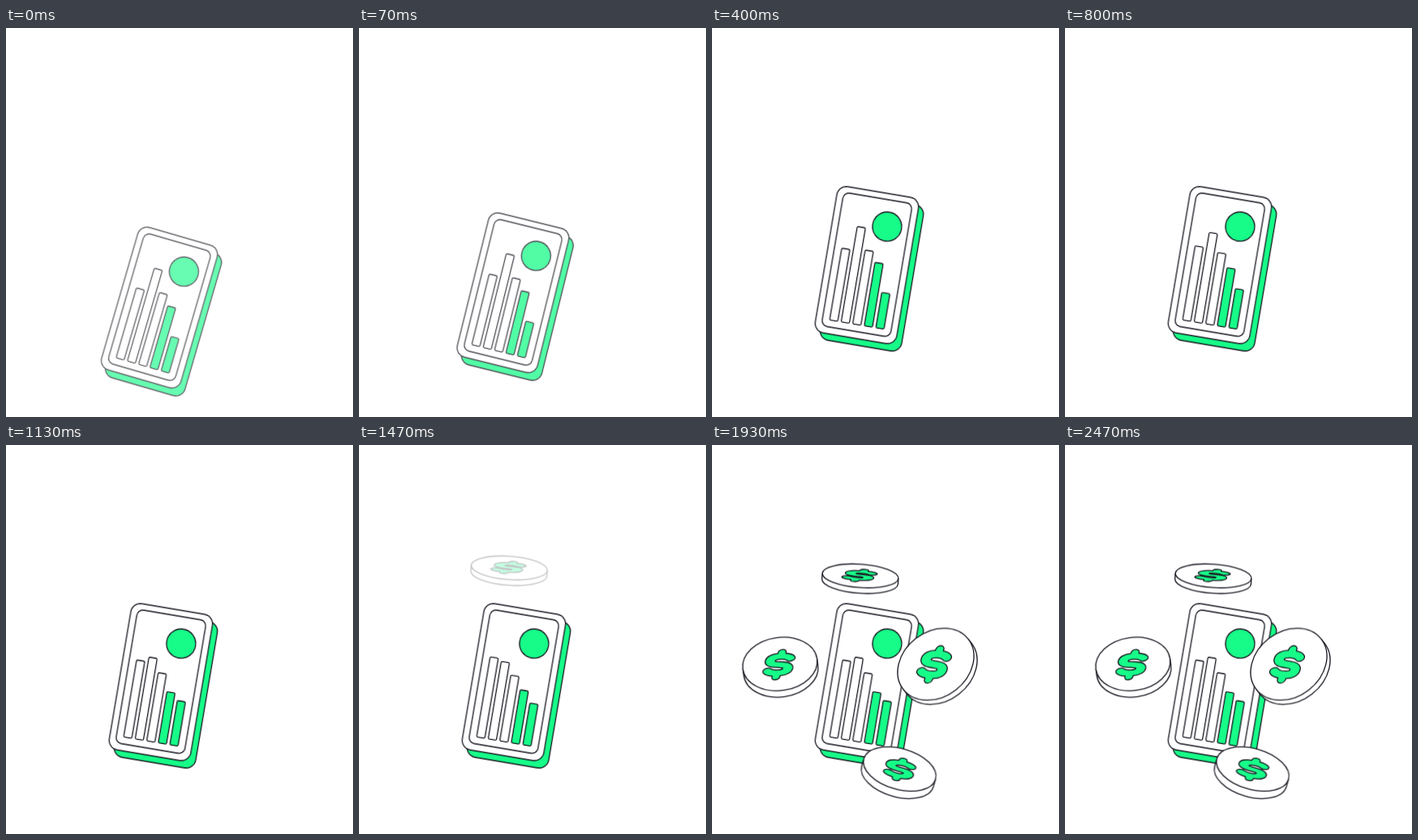
Animation of 428x480 px, one loop 3140 ms. Source, as an HTML page:

```html
<!DOCTYPE html>
<html lang="en">
<head>
<meta charset="utf-8">
<title>Phone and coins</title>
<style>
  html, body { margin: 0; width: 100%; height: 100%; overflow: hidden; background: #fff; }
  svg { display: block; width: 428px; height: 480px; }
  svg * { vector-effect: non-scaling-stroke; }
  .line { fill: #fff; stroke: #14141e; stroke-width: 1.3px; stroke-linejoin: round; }
  .green { fill: #17fb88; }
</style>
</head>
<body>
<svg viewBox="0 0 428 480" xmlns="http://www.w3.org/2000/svg">
  <defs>
    <path id="dollar" class="line green" d="M-5-18V-19A5 5 0 0 1 5-19V-17.5C11-16.5 15-14.5 17.5-11
      C20-5.5 13-2 8.5-6C6-8 3-8.5 0-8.5C-7-8.5-8-5.5-2-4.8L5-3.7C14-2.5 18.5 2.5 18.5 8C18.5 14 13 18 5 18
      V19A5 5 0 0 1-5 19V17.5C-11 16.5-15 14.5-17.5 11C-20 5.5-13 2-8.5 6C-6 8-3 8.5 0 8.5
      C7 8.5 8 5.5 2 4.8L-5 3.7C-14 2.5-18.5-2.5-18.5-8C-18.5-14-13-18-5-18Z"/>
  </defs>
  <g id="phone">
    <rect class="line green" x="-43.5" y="-83.5" width="102" height="183" rx="12"/>
    <rect class="line" x="-51" y="-91.5" width="102" height="183" rx="12"/>
    <rect class="line" x="-43" y="-84" width="86" height="167" rx="7.5"/>
    <g id="bars"></g>
    <circle class="line green" cx="16.7" cy="-51" r="18"/>
  </g>
  <g id="coins"></g>
</svg>
<script>
const LOOP = 3140;
const byId = id => document.getElementById(id);

function add(parent, tag, attrs = {}) {
  const node = document.createElementNS('http://www.w3.org/2000/svg', tag);
  for (const name in attrs) node.setAttribute(name, attrs[name]);
  return parent.appendChild(node);
}

// keys: [milliseconds, styles, easing towards the next key]
function play(node, keys) {
  const frames = keys.map(([ms, style, easing = 'linear']) => ({ ...style, easing, offset: ms / LOOP }));
  node.animate(frames, { duration: LOOP, iterations: Infinity });
}

// Phone: rises, overshoots a little and settles
const phonePose = (x, y, angle) => ({ transform: `translate(${x}px, ${y}px) rotate(${angle}deg)` });
const start = phonePose(189.2, 345, 16.2);
const rest = phonePose(191, 292.6, 9.6);
play(byId('phone'), [
  [0, start], [40, start, 'cubic-bezier(.3,.5,.5,1)'],
  [200, phonePose(191.4, 290.5, 9.3), 'ease-in-out'],
  [400, rest], [LOOP, rest]
]);
play(byId('phone'), [[0, { opacity: .66 }], [40, { opacity: .66 }], [150, { opacity: 1 }], [LOOP, { opacity: 1 }]]);

// Bars: top edge at the start, at rest and at the swing in between
const BASE = 74.3;
const tops = [
  [-15.5, -22, -27], [-45, -28, -21], [-18, -11, -7], [-5, 10.3, 7.3], [30.2, 19, 23]
];
tops.forEach(([first, last, swing], i) => {
  const bar = add(byId('bars'), 'rect', {
    class: i > 2 ? 'line green' : 'line', x: -34 + 14.45 * i, width: 10.2, rx: 1.5
  });
  const size = top => ({ y: `${top}px`, height: `${BASE - top}px` });
  play(bar, [
    [0, size(first)], [560, size(first), 'ease-in-out'],
    [1080, size(last)], [1140, size(last), 'ease-in-out'],
    [1640, size(swing)], [1680, size(swing), 'ease-in-out'],
    [1920, size(last)], [LOOP, size(last)]
  ]);
});

// Coins: fade in while dropping into place
const coins = [
  { at: 1430, x: 183, y: 161.5, rx: 47, ry: 14.4, depth: 7, tilt: 4, sign: '1.06 .07 -.3 .31 -1 -.5' },
  { at: 1520, x: 231.5, y: 399.7, rx: 46, ry: 25.2, depth: 9.5, tilt: 16, sign: '1 .19 -.22 .57 0 .5' },
  { at: 1605, x: 276, y: 270.5, rx: 50.7, ry: 40.2, depth: 6.5, tilt: -38, sign: '1 .02 -.36 .96 -2 .3' },
  { at: 1672, x: 83.8, y: 270.2, rx: 46.2, ry: 32.8, depth: 8, tilt: -8, sign: '1 -.08 -.2 .78 -1.2 .8' }
];
for (const { at, x, y, rx, ry, depth, tilt, sign } of coins) {
  const place = add(byId('coins'), 'g', { transform: `translate(${x} ${y})` });
  const coin = add(place, 'g');
  const disc = add(coin, 'g', { transform: `rotate(${tilt})` });
  add(disc, 'path', { class: 'line', d: `M${-rx} 0v${depth}a${rx} ${ry} 0 0 0 ${2 * rx} 0v${-depth}` });
  add(disc, 'ellipse', { class: 'line', rx, ry });
  add(coin, 'use', { href: '#dollar', transform: `matrix(${sign})` });

  const above = { transform: 'translate(2.5px, -10.5px)' };
  const landed = { transform: 'translate(0px, 0px)' };
  play(coin, [[0, above], [at, above, 'ease-in-out'], [at + 250, landed], [LOOP, landed]]);
  play(coin, [[0, { opacity: 0 }], [at, { opacity: 0 }], [at + 160, { opacity: 1 }], [LOOP, { opacity: 1 }]]);
}
</script>
</body>
</html>
```
